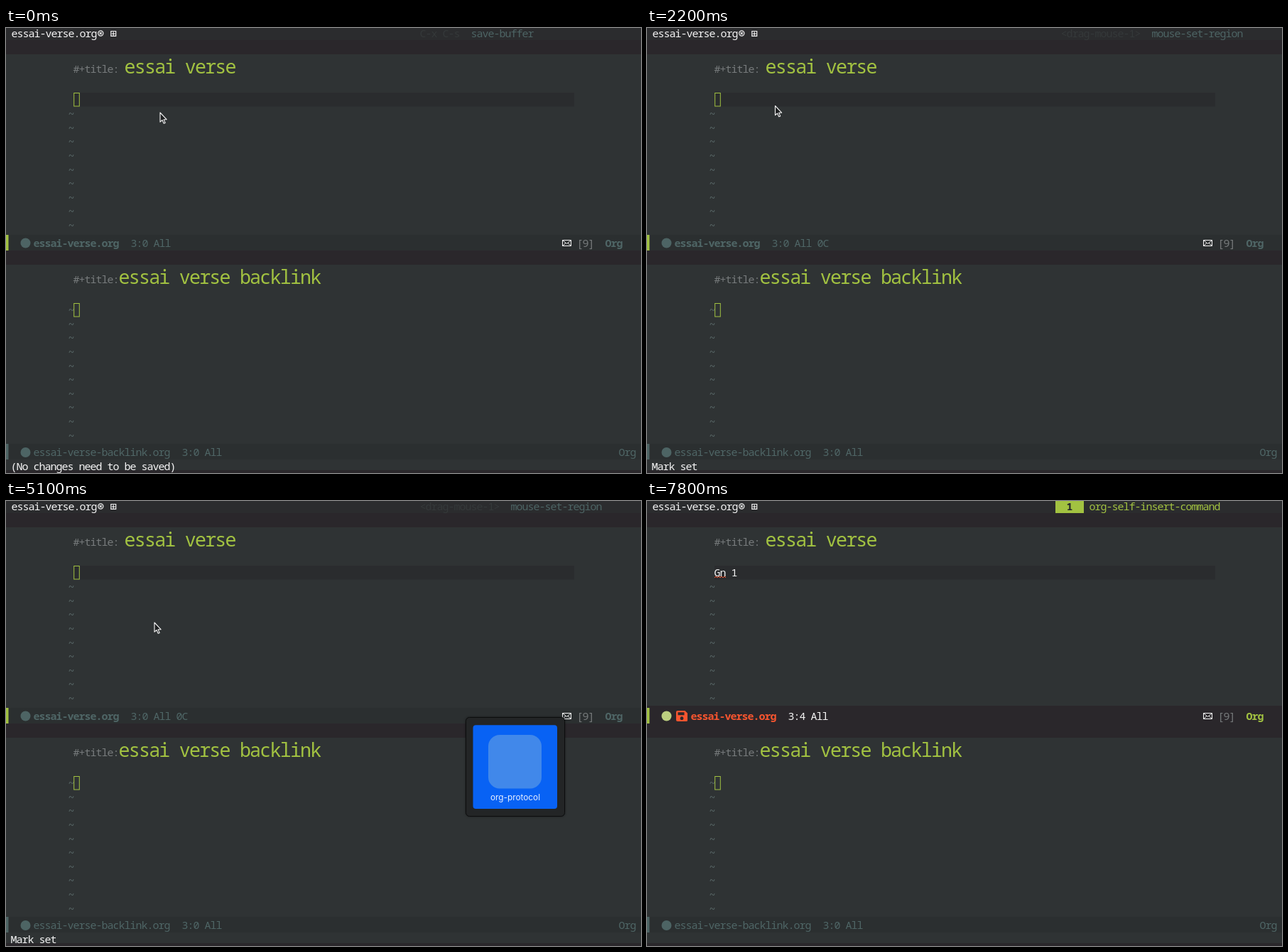
An HTML page that plays this animation: 894 by 626 pixels, repeating every 8 s.

```html
<!DOCTYPE html>
<html lang="en">
<head>
<meta charset="utf-8">
<title>Org buffers</title>
<style>
  html, body { margin: 0; width: 100%; height: 100%; overflow: hidden; background: #2f3334; }
  svg { display: block; }
  /* Tight tracking gives tall letters on an 8px grid. */
  text {
    font: 15px "Noto Sans Mono", "DejaVu Sans Mono", monospace;
    letter-spacing: -1px; white-space: pre; transform: translateX(-.5px);
  }
  .bold { font-weight: 700; }
  .title { font-size: 26.67px; letter-spacing: -1.8px; transform: translateX(-.9px); }
  .label { font: 11.8px Inter, "Open Sans", sans-serif; letter-spacing: 0; transform: none; }
</style>
</head>
<body>
<svg id="stage" width="894" height="626" viewBox="0 0 894 626"></svg>
<script>
const LOOP = 8000, CHAR = 8;
const C = {
  bg: '#2f3334', bar: '#2b2c2e', band: '#2a272b', idleLine: '#2b2f30', row: '#2a2c2e',
  green: '#a2c241', pale: '#bccf80', teal: '#4d6464', dim: '#4f6666', faint: '#35393a',
  grey: '#777b7c', tilde: '#5b6b6b', white: '#f4f4f4', red: '#f8552f', select: '#4b5354'
};
const stage = document.getElementById('stage');

function add(tag, attrs = {}, parent = stage) {
  const node = document.createElementNS('http://www.w3.org/2000/svg', tag);
  set(node, attrs);
  parent.append(node);
  return node;
}
function set(node, attrs) {
  for (const name in attrs) node.setAttribute(name, attrs[name]);
}
function show(node, on) {
  node.style.display = on ? '' : 'none';
}
function rect(x, y, width, height, fill, more = {}, parent = stage) {
  return add('rect', { x, y, width, height, fill, ...more }, parent);
}
function text(x, y, content, fill, cls = '', parent = stage) {
  const node = add('text', { x, y, fill, class: cls }, parent);
  node.textContent = content;
  return node;
}
function tildes(y, count) {
  for (let i = 0; i < count; i++) text(88, y + i * 19.6, '~', C.tilde);
}

// Backgrounds
rect(0, 0, 894, 17, C.bar);
rect(0, 17, 894, 20, C.band);
rect(0, 313, 894, 20, C.band);
rect(0, 585, 894, 22, C.idleLine);
rect(0, 622, 894, 4, C.band);
const modeBar = rect(0, 291, 894, 22, C.idleLine);
rect(0, 291, 3.5, 22, C.green);
rect(0, 585, 3.5, 22, C.teal);

// Tab bar
text(8, 13, 'essai-verse.org', C.white);
const tabIcons = { fill: 'none', stroke: C.white, 'stroke-width': 1.2 };
add('circle', { cx: 133.3, cy: 7.5, r: 3.6, ...tabIcons });
add('path', { d: 'M131.6 5.8l3.4 3.4m0-3.4l-3.4 3.4', ...tabIcons });
add('path', { d: 'M147.8 4.5h6.9v6.9h-6.9zM151.25 5.5v5M148.8 8h5', ...tabIcons });
const keyBox = rect(575, 0, 0, 17, C.green);
const keyText = text(0, 13, '', C.faint);
keyText.setAttribute('text-anchor', 'middle');
const command = text(0, 13, '', C.teal);

// Upper buffer
const currentRow = rect(95, 91, 705, 19.5, C.row);
text(95, 63, '#+title:', C.grey);
text(167.5, 64, 'essai verse', C.green, 'title');
tildes(126.2, 9);
const selection = rect(95, 91, 8, 19.5, C.select);
const cursor = add('rect', { stroke: C.green });
const typed = text(95, 106, '', C.white);
const squiggle = add('path', {
  d: 'M95 108' + 'l2-2l2 2'.repeat(4), fill: 'none', stroke: C.red, 'stroke-width': 1
});

// Upper mode line
const modeDot = add('circle', { cx: 27.5, cy: 302.5, r: 7 });
const floppy = add('path', {
  d: 'M43 295h10.5l3.5 3.5v10q0 1.5-1.5 1.5h-12.5q-2 0-2-2v-11q0-2 2-2zM43.5 297.2v4h9v-4z' +
     'M49 303.3a2.4 2.4 0 1 0 .01 0z',
  fill: C.red, 'fill-rule': 'evenodd'
});
const fileName = text(39, 308, 'essai-verse.org', C.dim, 'bold');
const position = text(176, 308, '', C.dim);
const count = text(240, 308, '', C.dim);
add('path', {
  d: 'M783.5 298.5h12v8h-12zl6 5l6-5M783.5 306.5l4.5-4M795.5 306.5l-4.5-4',
  fill: 'none', stroke: C.white, 'stroke-width': 1
});
text(804, 308, '[9]', C.grey);
const mode = text(844, 308, 'Org', C.dim, 'bold');

// Lower buffer
text(95, 359, '#+title:', C.grey);
text(159.5, 360, 'essai verse backlink', C.green, 'title');
tildes(402.2, 10);
rect(95.7, 387.5, 7.6, 18.5, 'none', { stroke: C.green });
add('circle', { cx: 27.5, cy: 597, r: 7, fill: C.teal });
text(39, 602, 'essai-verse-backlink.org', C.dim);
text(248, 602, '3:0 All', C.dim);
text(863, 602, 'Org', C.dim);
const message = text(7, 622, '', C.white);

// Application switcher
const popup = add('g', { style: 'filter:drop-shadow(0 0 1.5px rgba(0,0,0,.5))' });
rect(647.5, 304.5, 139, 139, '#232526', { rx: 5, stroke: '#0c0d0d' }, popup);
rect(657.5, 315.3, 118.5, 117.7, '#0862f4', { rx: 4 }, popup);
rect(679, 329, 75, 75.5, '#4188ea', { rx: 16 }, popup);
const label = text(717, 421, 'org-protocol', '#e9f0ff', 'label', popup);
label.setAttribute('text-anchor', 'middle');

const pointer = add('path', {
  d: 'M.5.5v13.2l3-2.7l2.2 4.8l2-.9l-2.1-4.7h4z',
  fill: '#1e2021', stroke: C.white, 'stroke-width': 1.1, 'stroke-linejoin': 'round'
});

// Each step changes part of the state and holds until the next.
const steps = [
  [0, { key: 'C-x C-s', command: 'save-buffer', message: '(No changes need to be saved)',
        line: 3, column: 0, chars: '', typed: '', selected: false, misspelt: false,
        focus: false, popup: false, blinkOff: false, pointer: [216.5, 118.5] }],
  [700, { key: '<down-mouse-1>', command: 'mouse-drag-region', message: '', line: 4, chars: '0C' }],
  [900, { key: '<mouse-1>', command: 'mouse-set-point', chars: '' }],
  [1600, { pointer: [197.5, 109] }],
  [1700, { pointer: [188, 105] }],
  [1800, { pointer: [184, 104], key: '<down-mouse-1>', command: 'mouse-drag-region', line: 3, chars: '0C' }],
  [1900, { pointer: [183, 104] }],
  [2000, { pointer: [182, 104], key: '<drag-mouse-1>', command: 'mouse-set-region', message: 'Mark set' }],
  [2200, { pointer: [180, 109] }],
  [2300, { pointer: [174, 121] }],
  [2400, { pointer: [171, 128] }],
  [3200, { pointer: [118, 70] }],
  [3300, { pointer: [86, 35] }],
  [4300, { pointer: [88, 32] }],
  [4400, { pointer: [112, 60] }],
  [4500, { pointer: [155, 115] }],
  [4600, { pointer: [195, 157] }],
  [4700, { pointer: [208.5, 170.5] }],
  [5100, { popup: true }],
  [5500, { popup: false }],
  [5600, { focus: true }],
  [6000, { blinkOff: true }],
  [6500, { key: 'G', command: 'org-self-insert-command', message: '', typed: 'G', column: 1,
           chars: '1C', selected: true, blinkOff: false, pointer: null }],
  [6800, { key: 'n', typed: 'Gn', column: 2, chars: '', selected: false }],
  [7000, { key: 'SPC', typed: 'Gn ', column: 3, misspelt: true }],
  [7300, { key: '1', typed: 'Gn 1', column: 4 }],
  [7800, { blinkOff: true }]
];

function stateAt(time) {
  return Object.assign({}, ...steps.filter(step => step[0] <= time).map(step => step[1]));
}

function draw(time) {
  const s = stateAt(time), focus = s.focus, modified = s.typed !== '';

  const cells = Math.max(s.key.length + 2, 5);
  show(keyBox, focus);
  set(keyBox, { width: cells * CHAR });
  set(keyText, { x: 575 + cells * CHAR / 2, fill: focus ? '#25282a' : C.faint, class: focus ? 'bold' : '' });
  keyText.textContent = s.key;
  set(command, { x: 575 + (cells + 1) * CHAR, fill: focus ? C.green : C.teal });
  command.textContent = s.command;

  show(currentRow, s.line === 3);
  show(selection, s.selected);
  show(squiggle, s.misspelt);
  typed.textContent = s.typed;
  show(cursor, !s.blinkOff);
  set(cursor, {
    x: 95.7 + s.column * CHAR, y: s.line === 3 ? 91.5 : 111, width: focus ? 7.2 : 7.6,
    height: 18.5, fill: focus ? C.green : 'none'
  });

  const top = modified ? 288 : 291, shift = modified ? 23 : 0;
  set(modeBar, { y: top, height: 313 - top, fill: focus ? C.band : C.idleLine });
  set(modeDot, { fill: focus ? C.pale : C.teal });
  show(floppy, modified);
  set(fileName, { x: 39 + shift, fill: modified ? C.red : focus ? C.white : C.dim });
  set(position, { x: 176 + shift, fill: focus ? C.white : C.dim });
  position.textContent = `${s.line}:${s.column} All`;
  set(count, { x: 240 + shift, fill: focus ? C.green : C.dim });
  count.textContent = s.chars;
  set(mode, { fill: focus ? C.green : C.dim });

  message.textContent = s.message;
  show(popup, s.popup);
  show(pointer, s.pointer);
  if (s.pointer) set(pointer, { transform: `translate(${s.pointer})` });
}

const start = performance.now();
function tick() {
  draw((performance.now() - start) % LOOP);
  requestAnimationFrame(tick);
}
tick();
</script>
</body>
</html>
```
